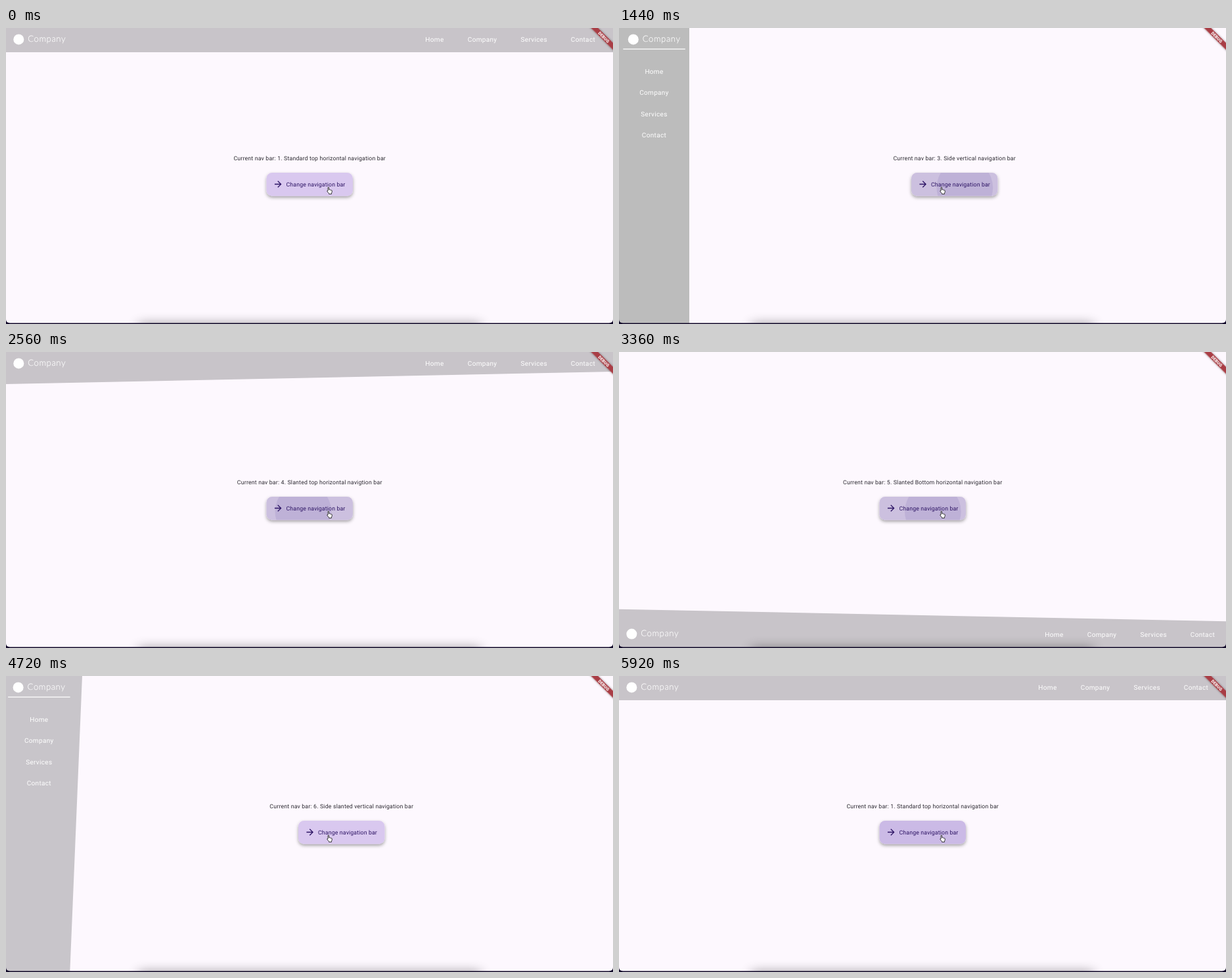
Write an HTML page that moves like this. It is 924x452 px and loops after 6000 ms.

```html
<!DOCTYPE html>
<html lang="en">
<head>
<meta charset="utf-8">
<title>Navigation bar demo</title>
<style>
  html, body { margin: 0; width: 100%; height: 100%; overflow: hidden; background: #fdf8fe; }
  svg { display: block; width: 100vw; height: 100vh; }
  text { font-family: Roboto, sans-serif; text-rendering: geometricPrecision; }
  .link { font-size: 10px; letter-spacing: .33px; fill: #fff; }
  .brand { font: 300 13.2px Lato, sans-serif; letter-spacing: .52px; fill: #fff; stroke: #fff; stroke-width: .15; }
  .caption { font-size: 8.75px; letter-spacing: .175px; fill: #2b2930; }
  .label { font-size: 8.75px; letter-spacing: .14px; fill: #2b1263; }
  .debug { font-size: 6.4px; font-weight: 900; letter-spacing: .1px; fill: #fff; }
  .middle { text-anchor: middle; }
</style>
</head>
<body>
<svg id="stage" viewBox="0 0 924 452" preserveAspectRatio="none">
  <defs>
    <filter id="blur" x="-20%" y="-300%" width="140%" height="700%"><feGaussianBlur stdDeviation="9"/></filter>
    <filter id="lift" x="-20%" y="-40%" width="140%" height="200%">
      <feDropShadow dx="0" dy="2.4" stdDeviation="2.5" flood-color="#000" flood-opacity=".36"/>
    </filter>
    <filter id="soft" x="-20%" y="-100%" width="140%" height="300%">
      <feDropShadow dx="0" dy="0" stdDeviation="1.8" flood-color="#000" flood-opacity=".5"/>
    </filter>
    <clipPath id="face"><rect x="-65.7" y="221" width="131.4" height="35.5" rx="8.5"/></clipPath>
  </defs>
  <rect width="924" height="452" fill="#fdf8fe"/>
  <g id="bars"></g>

  <g id="content">
    <text id="caption" class="caption middle" x="0" y="202.2"></text>
    <rect x="-65.7" y="221" width="131.4" height="35.5" rx="8.5" fill="#d9c8ef" filter="url(#lift)"/>
    <g clip-path="url(#face)">
      <rect id="highlight" x="-66" y="221" width="132" height="36" fill="#3c6428"/>
      <circle id="ripple" fill="#503c96"/>
    </g>
    <path transform="translate(-55.9 230.6) scale(.66)" fill="#2b1263"
      d="M12 4l-1.41 1.41L16.17 11H4v2h12.17l-5.58 5.59L12 20l8-8z"/>
    <text class="label" x="-35.7" y="241.7">Change navigation bar</text>
  </g>

  <path transform="translate(488 242.5)" fill="#fff" stroke="#222" stroke-width=".9" stroke-linejoin="round"
    d="M2 1.6Q2 .5 2.8 .5T3.6 1.6V4.4Q4.7 3.9 5.2 4.7Q6.2 4.3 6.7 5.2Q8.3 4.9 8.3 6.4Q8.4 8.6 7.5 9.6V11H3.5V10Q2 8.7 .8 6.7Q.5 5.7 2 6.3Z"/>

  <g transform="translate(924 0) rotate(45)">
    <rect x="-40" y="16.1" width="80" height="7.4" fill="#a93c44" filter="url(#soft)"/>
    <text class="debug middle" x="0" y="22.1">DEBUG</text>
  </g>

  <rect x="202" y="452" width="520" height="24" fill="#000" opacity=".4" filter="url(#blur)"/>
  <path fill="#120a2a" d="M0 445Q0 450.4 6 450.4H918Q924 450.4 924 445V452H0Z"/>
</svg>
<script>
const LOOP = 6000, STEP = 80;
const LINKS = ["Home", "Company", "Services", "Contact"];
const CENTER = 462.2, SIDE_CENTER = 510.7;
const CURSOR = { x: 492, y: 248 };
const $ = id => document.getElementById(id);

function add(parent, tag, attrs, text) {
  const el = document.createElementNS("http://www.w3.org/2000/svg", tag);
  for (const key in attrs) el.setAttribute(key, attrs[key]);
  if (text) el.textContent = text;
  parent.appendChild(el);
  return el;
}

function bar(fill, points) {
  const g = add($("bars"), "g", {});
  add(g, "polygon", { points, fill });
  return g;
}

function brand(g, x, y) {
  add(g, "circle", { cx: x, cy: y, r: 8, fill: "#fff" });
  add(g, "text", { class: "brand", x: x + 14, y: y + 3.7 }, "Company");
}

function horizontal(fill, points, y, shift = 0) {
  const g = bar(fill, points);
  brand(g, 19.3, y - .4);
  [638.3, 702.8, 783.6, 859.8].forEach((x, i) =>
    add(g, "text", { class: "link", x: x + shift, y: y + 3.6 }, LINKS[i]));
  return g;
}

function vertical(fill, points, x) {
  const g = bar(fill, points);
  brand(g, x - 31.7, 17.4);
  add(g, "rect", { x: x - 47.2, y: 31.5, width: 94.5, height: 1.3, fill: "#fff" });
  LINKS.forEach((name, i) =>
    add(g, "text", { class: "link middle", x, y: 69.9 + i * 32.5 }, name));
  return g;
}

const states = [
  { caption: "1. Standard top horizontal navigation bar", center: CENTER,
    bar: horizontal("#c8c4c9", "0,0 924,0 924,37 0,37", 17.8) },
  { caption: "2. Bottom horizontal navigation bar", center: CENTER,
    bar: horizontal("#c8c4c9", "0,411.3 924,411.3 924,452 0,452", 431) },
  { caption: "3. Side vertical navigation bar", center: SIDE_CENTER,
    bar: vertical("#bcbcbc", "0,0 107,0 107,452 0,452", 53.5) },
  { caption: "4. Slanted top horizontal navigtion bar", center: CENTER,
    bar: horizontal("#c8c4c9", "0,0 924,0 924,30 0,49", 17.8) },
  { caption: "5. Slanted Bottom horizontal navigation bar", center: CENTER,
    bar: horizontal("#c8c4c9", "0,392.7 924,411.3 924,452 0,452", 431, 10) },
  { caption: "6. Side slanted vertical navigation bar", center: SIDE_CENTER,
    bar: vertical("#c8c5ca", "0,0 116,0 97.3,452 0,452", 50.3) }
];

// Moments at which the next bar appears; each press starts one step earlier.
const switches = [480, 1440, 2560, 3360, 4240, 5680];
const clamp = v => Math.max(0, Math.min(1, v));

function drawPress(t) {
  const press = switches.filter(s => t >= s - STEP).length - 1;
  const since = press < 0 ? Infinity : t - switches[press];
  const active = since < 400;
  const age = active ? since + STEP : 0;
  const p = 1 - (1 - clamp(age / 290)) ** 2;
  // The splash keeps its place relative to the button when the layout moves.
  const from = active ? CURSOR.x - states[press].center : 0;
  const fade = active ? clamp(age / 75) * (1 - clamp((since - 225) / 150)) : 0;
  const ripple = $("ripple");
  ripple.setAttribute("cx", from * (1 - p));
  ripple.setAttribute("cy", CURSOR.y + (238.8 - CURSOR.y) * p);
  ripple.setAttribute("r", 20 + 48 * p);
  ripple.setAttribute("opacity", .115 * fade);
  $("highlight").setAttribute("opacity", active ? .08 * (1 - clamp(since / 200)) : 0);
}

function draw(time) {
  const t = Math.floor((time % LOOP) / STEP) * STEP;
  const index = switches.filter(s => t >= s).length % states.length;
  const state = states[index];
  states.forEach((s, i) => s.bar.setAttribute("visibility", i === index ? "visible" : "hidden"));
  $("caption").textContent = "Current nav bar: " + state.caption;
  $("content").setAttribute("transform", `translate(${state.center} 0)`);
  drawPress(t);
}

const start = performance.now();
function tick() {
  draw(performance.now() - start);
  requestAnimationFrame(tick);
}
tick();
</script>
</body>
</html>
```
